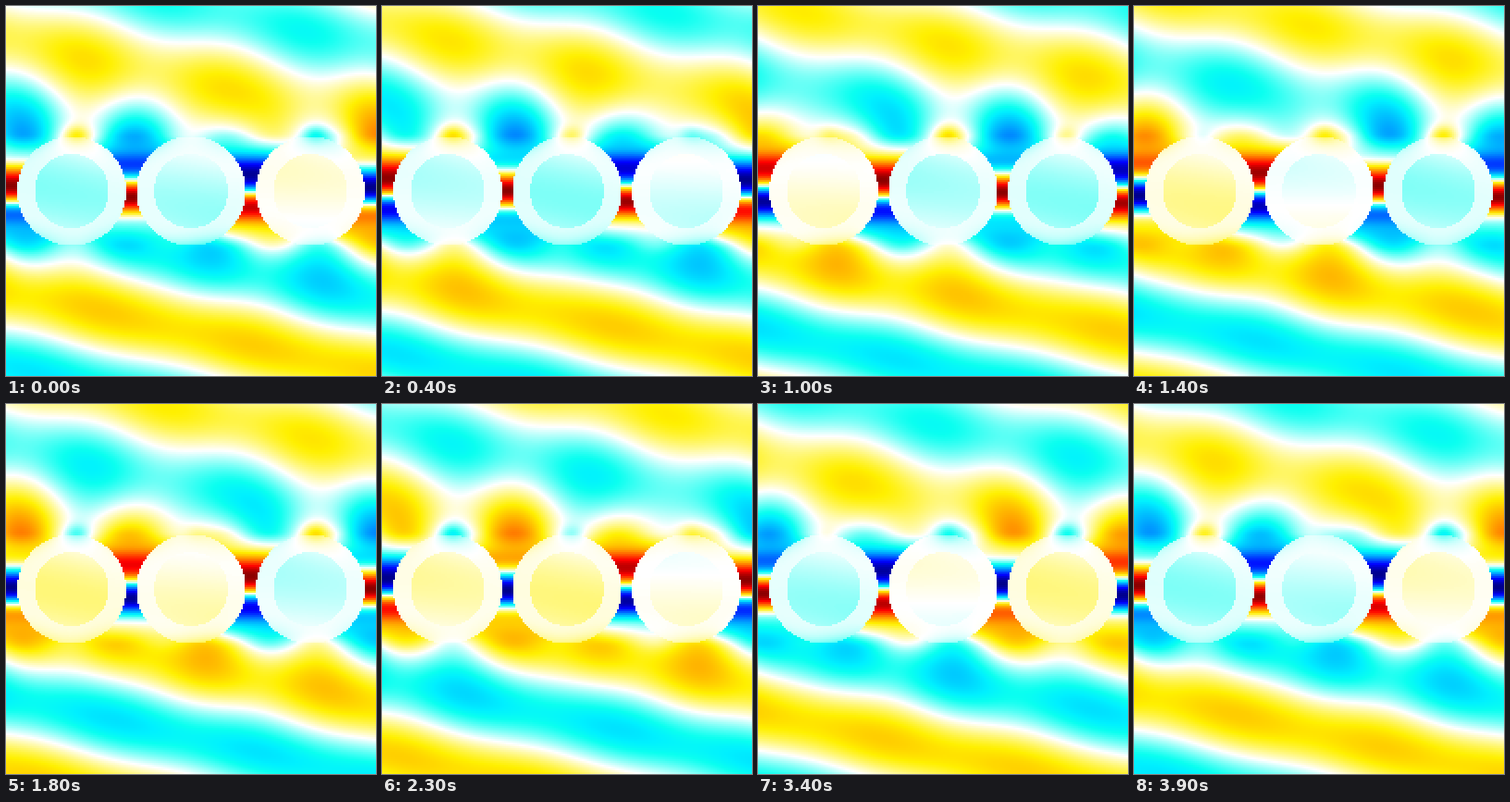
These frames come from a looping animation (400 px wide and 400 px high, 4000 ms). An HTML page with a canvas:

```html
<!DOCTYPE html>
<html lang="en">
<head>
<meta charset="utf-8">
<title>Wave through a row of coated cylinders</title>
<style>
  html, body { margin: 0; width: 100%; height: 100%; overflow: hidden; background: #fff; }
  canvas { display: block; width: 400px; height: 400px; image-rendering: pixelated; }
</style>
</head>
<body>
<canvas id="field" width="200" height="200"></canvas>
<script>
const N = 200, SCALE = 2, LOOP = 4000, STEP = 100;
const PERIOD = 129, CYL_X = 71, GAP_X = 135, MID_Y = 200;
const R_OUT = 59, R_CORE = 40;
const BLOCH = 2 * Math.PI * 700 / LOOP;      // phase step per cylinder
const KX = BLOCH / PERIOD, G = 2 * Math.PI / PERIOD, KY = 2 * Math.PI / 166;
const SLOPE = KX / KY;
const DEG = Math.PI / 180;

// Complex numbers as [re, im]
const polar = (r, a) => [r * Math.cos(a), r * Math.sin(a)];
const sum = (...zs) => zs.reduce((s, z) => [s[0] + z[0], s[1] + z[1]], [0, 0]);
const scale = (z, k) => [z[0] * k, z[1] * k];
const mix = (a, b, k) => sum(scale(a, 1 - k), scale(b, k));

// Plane wave plus the two slowest evanescent orders, above and below the row
const SIDES = {
  above: { amp: 0.205, crest: 36, m1: 0.14, x1: 85, p1: 0.17, phase: -0.3 },
  below: { amp: 0.28, crest: 307, m1: 0.07, x1: 110, p1: 0.11, phase: 0.1 }
};

function orders(x, y) {
  const s = y < MID_Y ? SIDES.above : SIDES.below;
  const d = Math.max(0, Math.abs(y - MID_Y) - 60);
  return sum(
    polar(s.amp, KY * (s.crest + SLOPE * x - y)),
    polar(s.m1 * Math.exp(-0.0105 * d), (KX - G) * (x - s.x1)),
    polar(s.p1 * Math.exp(-0.042 * d), (KX + G) * (x - CYL_X) + s.phase)
  );
}

// Strong upward wave squeezed between neighbours
function gapWave(v, gap) {
  const amp = 0.36 + 0.62 * Math.exp(-(((v + 4) / 34) ** 4));
  return polar(amp, (20 - 160 * Math.tanh((v - 3) / 32)) * DEG + gap * BLOCH);
}

// Small bright spot on the crown of each cylinder
function crown(u, y, cell) {
  const amp = 0.15 * Math.exp(-((u - 5) ** 2) / 150 - (y - 139) ** 2 / 90);
  return polar(amp, 25 * DEG + cell * BLOCH);
}

function outside(x, y, u, cell) {
  const v = y - MID_Y;
  const gap = Math.round((x - GAP_X) / PERIOD), w = x - GAP_X - gap * PERIOD;
  const k = Math.exp(-((v / 52) ** 6) - (w / 45) ** 4);
  return sum(mix(orders(x, y), gapWave(v, gap), k), crown(u, y, cell));
}

function inside(x, y, u, r, cell) {
  const v = y - MID_Y;
  const amp = 0.122 * (1 - ((v - 0.25 * u - 8) / 60) ** 2);
  const core = polar(amp, 162 * DEG - 0.01 * v + cell * BLOCH);
  if (r < R_CORE) return core;
  const cap = 0.5 * Math.exp((r - R_OUT) / 9) * (v / r) ** 4;
  return sum(scale(core, 0.25), scale(orders(x, y), cap), scale(crown(u, y, cell), 0.6));
}

function fieldAt(x, y) {
  const cell = Math.round((x - CYL_X) / PERIOD), u = x - CYL_X - cell * PERIOD;
  const r = Math.hypot(u, y - MID_Y);
  return r < R_OUT ? inside(x, y, u, r, cell) : outside(x, y, u, cell);
}

// Diverging colour scale for -1..1
const STOPS = [
  [-1, 0, 0, 128], [-0.75, 0, 0, 255], [-0.28, 0, 240, 255], [-0.23, 10, 255, 240],
  [0, 255, 255, 255],
  [0.23, 255, 240, 0], [0.75, 255, 0, 0], [1, 128, 0, 0]
];
const LEVELS = 1024;
const palette = new Uint8ClampedArray((LEVELS + 1) * 3);
for (let i = 0; i <= LEVELS; i++) {
  const value = 2 * i / LEVELS - 1;
  const hi = Math.max(1, STOPS.findIndex(s => s[0] >= value));
  const a = STOPS[hi - 1], b = STOPS[hi], k = (value - a[0]) / (b[0] - a[0]);
  for (let c = 0; c < 3; c++) palette[i * 3 + c] = a[c + 1] + (b[c + 1] - a[c + 1]) * k;
}

const re = new Float32Array(N * N), im = new Float32Array(N * N);
for (let i = 0; i < N * N; i++) {
  [re[i], im[i]] = fieldAt((i % N + 0.5) * SCALE, (Math.floor(i / N) + 0.5) * SCALE);
}

const ctx = document.getElementById("field").getContext("2d");
const image = ctx.createImageData(N, N);
image.data.fill(255);

function draw(step) {
  const a = 2 * Math.PI * step * STEP / LOOP, c = Math.cos(a), s = Math.sin(a);
  for (let i = 0; i < N * N; i++) {
    const value = Math.max(-1, Math.min(1, re[i] * c + im[i] * s));
    const p = Math.round((value + 1) * LEVELS / 2) * 3;
    image.data[i * 4] = palette[p];
    image.data[i * 4 + 1] = palette[p + 1];
    image.data[i * 4 + 2] = palette[p + 2];
  }
  ctx.putImageData(image, 0, 0);
}

let start = null, last = -1;
function tick() {
  const now = performance.now();
  if (start === null) start = now;
  const step = Math.floor(((now - start) % LOOP) / STEP);
  if (step !== last) draw(last = step);
  requestAnimationFrame(tick);
}
tick();
</script>
</body>
</html>
```
